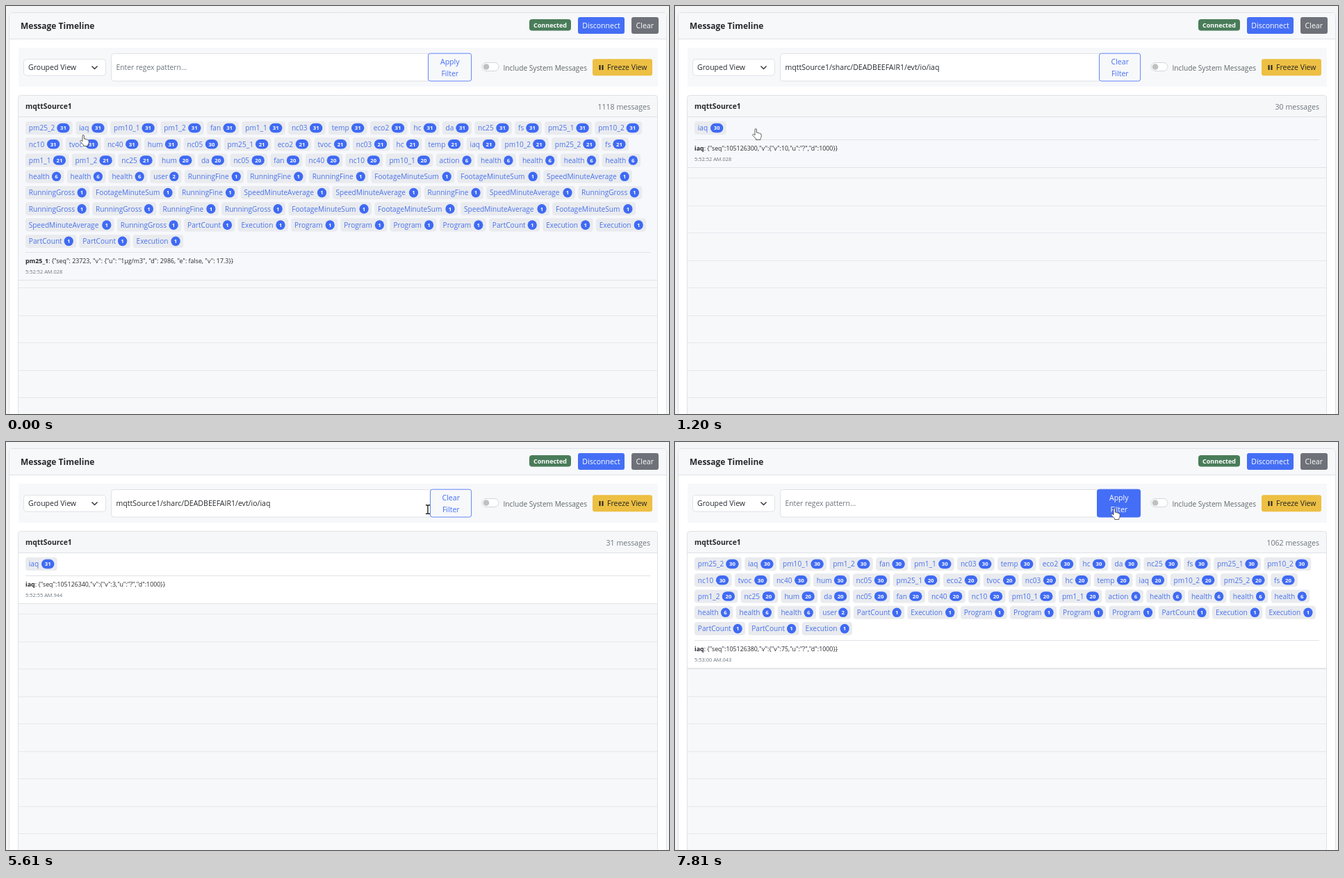
Write an HTML page with a canvas that moves like this. It is 954 px wide and 587 px high and loops after 8000 ms.

```html
<!DOCTYPE html>
<html lang="en">
<head>
<meta charset="utf-8">
<title>Message Timeline</title>
<style>
  html, body { margin: 0; width: 100%; height: 100%; overflow: hidden; background: #f4f5f6; }
  canvas { display: block; width: 954px; height: 587px; }
</style>
</head>
<body>
<canvas id="stage"></canvas>
<script>
const W = 954, H = 587, LOOP = 8000;
const canvas = document.getElementById('stage');
const ctx = canvas.getContext('2d');
const scale = window.devicePixelRatio || 1;
canvas.width = W * scale;
canvas.height = H * scale;

const INK = '#26292d', GREY = '#6c757d', BLUE = '#446ef5', LINE = '#dfe2e6', PALE = '#f7f8fa';
const FIRST_ROW = 175.5, ROW_STEP = 23.27;

// Distance from one chip to the next, by topic name
const PITCH = {
  pm25_1: 72.2, pm25_2: 72.2, pm10_1: 72.2, pm10_2: 72.2, pm1_1: 66.7, pm1_2: 66.7,
  iaq: 50, fan: 50.3, temp: 60, eco2: 57.8, hc: 46, da: 46.5, fs: 43, tvoc: 55.2, hum: 56.8,
  nc03: 57.9, nc05: 57.9, nc10: 57.9, nc25: 57.9, nc40: 57.9,
  action: 59.5, health: 59.8, user: 49.6, PartCount: 77.4, Execution: 76.5, Program: 71.2,
  RunningFine: 89.5, RunningGross: 96.3, FootageMinuteSum: 123.9, SpeedMinuteAverage: 132
};

// A bare number sets the count of the names after it; chips wrap into rows
function layoutChips(list) {
  let count = 0, x = 28, y = FIRST_ROW;
  const chips = [];
  for (const word of list.trim().split(/\s+/)) {
    if (/^\d+$/.test(word)) { count = word; continue; }
    const width = PITCH[word] - 4.3;
    if (x + width > 927) { x = 28; y += ROW_STEP; }
    chips.push({ name: word, count, x, y, width });
    x += PITCH[word];
  }
  return chips;
}

const FIRST = 'pm25_2 iaq pm10_1 pm1_2 fan pm1_1 nc03 temp eco2 hc da nc25 fs pm25_1 pm10_2 nc10 tvoc nc40 hum';
const SECOND = 'pm25_1 eco2 tvoc nc03 hc temp iaq pm10_2 pm25_2 fs';
const THIRD = 'hum da nc05 fan nc40 nc10 pm10_1';
const STATUS = '6 action health health health health health health health 2 user 1';
const PARTS = 'PartCount Execution Program Program Program Program PartCount Execution Execution PartCount PartCount Execution';
const RUNS = `RunningFine RunningFine RunningFine FootageMinuteSum FootageMinuteSum SpeedMinuteAverage
  RunningGross FootageMinuteSum RunningFine SpeedMinuteAverage SpeedMinuteAverage RunningFine SpeedMinuteAverage RunningGross
  RunningGross RunningGross RunningFine RunningGross FootageMinuteSum FootageMinuteSum SpeedMinuteAverage FootageMinuteSum
  SpeedMinuteAverage RunningGross`;

const VIEWS = [
  { from: 0, total: 1118, topic: 'pm25_1', time: '5:52:52 AM.028',
    body: '{"seq": 23723, "v": {"u": "1µg/m3", "d": 2986, "e": false, "v": 17.3}}',
    chips: layoutChips(`31 ${FIRST} 30 nc05 21 ${SECOND} pm1_1 pm1_2 nc25 20 ${THIRD} ${STATUS} ${RUNS} ${PARTS}`) },
  { from: 1000, total: 30, topic: 'iaq', time: '5:52:52 AM.028', filtered: true,
    body: '{"seq":105126300,"v":{"v":10,"u":"?","d":1000}}', chips: layoutChips('30 iaq') },
  { from: 3810, total: 31, topic: 'iaq', time: '5:52:55 AM.944', filtered: true,
    body: '{"seq":105126340,"v":{"v":3,"u":"?","d":1000}}', chips: layoutChips('31 iaq') },
  { from: 7810, total: 1062, topic: 'iaq', time: '5:53:00 AM.043',
    body: '{"seq":105126380,"v":{"v":75,"u":"?","d":1000}}',
    chips: layoutChips(`30 ${FIRST} nc05 20 ${SECOND} pm1_2 nc25 ${THIRD} pm1_1 ${STATUS} ${PARTS}`) }
];

const POINTER = [
  { from: 0, kind: 'hand', x: 106, y: 185 },
  { from: 200, kind: 'hand', x: 110, y: 177 },
  { from: 400, kind: 'hand', x: 111, y: 176 },
  { from: 4610, kind: 'hand', x: 210, y: 152 },
  { from: 4810, kind: 'hand', x: 391, y: 125 },
  { from: 5010, kind: 'arrow', x: 394, y: 125 },
  { from: 5210, kind: 'beam', x: 472, y: 94 },
  { from: 5410, kind: 'beam', x: 554, y: 88 },
  { from: 5610, kind: 'beam', x: 603, y: 90 },
  { from: 5810, kind: 'hand', x: 622, y: 96 },
  { from: 6010, kind: 'hand', x: 627, y: 96 },
  { from: 7010, kind: 'hand', x: 627, y: 95 }
];

const SHAPES = {
  hand: new Path2D('M4 9.8V1.9Q4 .6 5.2 .6T6.4 1.9V6.2Q8.3 5.3 8.8 6.9Q10.6 6.2 11.1 7.7Q13.2 7.2 13.2 9.2V11.6Q13.1 13.4 11.8 14.8V16.5H5.6V15L1.3 10.7Q0 9 1.3 8.5Q2.6 8.2 4 9.8Z'),
  arrow: new Path2D('M.6 .6V13L3.6 10.2 5.5 14.6 7.4 13.8 5.5 9.6H9.9Z'),
  beam: new Path2D('M1 .8H3L4 1.6 5 .8H7M4 1.6V12.4M1 13.2H3L4 12.4 5 13.2H7')
};

const current = (steps, t) => steps.filter(step => step.from <= t).pop();

function rect(x, y, w, h, fill) {
  ctx.fillStyle = fill;
  ctx.fillRect(x, y, w, h);
}

function box(x, y, w, h, radius, fill, stroke) {
  ctx.beginPath();
  ctx.roundRect(x, y, w, h, radius);
  if (fill) { ctx.fillStyle = fill; ctx.fill(); }
  if (stroke) { ctx.strokeStyle = stroke; ctx.lineWidth = 1; ctx.stroke(); }
}

function disc(x, y, radius, fill) {
  ctx.beginPath();
  ctx.arc(x, y, radius, 0, 7);
  ctx.fillStyle = fill;
  ctx.fill();
}

// y is the middle of the capital letters
function text(value, x, y, size, color = INK, align = 'left', weight = 400) {
  ctx.font = `${weight} ${size}px "Open Sans", "Noto Sans", sans-serif`;
  ctx.textAlign = align;
  ctx.fillStyle = color;
  ctx.fillText(value, x, y + size * 0.36);
  return ctx.measureText(value).width;
}

function drawHeader() {
  rect(0, 0, W, H, '#f4f5f6');
  box(4.5, 9.5, 946, 600, 5, '#fff', LINE);
  box(5, 10, 945, 37, [4, 4, 0, 0], PALE);
  rect(5, 47, 945, 1, LINE);
  text('Message Timeline', 21, 28.7, 12, INK, 'left', 700);
  box(753, 19, 60, 16.5, 4, '#497c59');
  text('Connected', 783, 27.7, 9, '#fff', 'center', 700);
  box(823, 16, 67, 24, 3, BLUE);
  text('Disconnect', 856.5, 28.3, 10.55, '#fff', 'center');
  box(900, 16, 39, 24, 3, '#6e7178');
  text('Clear', 919.3, 28.3, 10.55, '#fff', 'center');
}

function drawToolbar(filtered, hovered) {
  rect(18, 60, 920, 56, PALE);
  box(25.5, 76.5, 118, 23.5, 4, '#fff', LINE);
  text('Grouped View', 32, 88.7, 10.55);
  ctx.strokeStyle = '#343a40';
  ctx.lineWidth = 1.5;
  ctx.stroke(new Path2D('M123.5 86.5L127.5 90.5 131.5 86.5'));

  const left = filtered ? 610.5 : 607.5;
  box(151.5, 68.5, left - 151.5, 39.5, [4, 0, 0, 4], '#fff', LINE);
  if (filtered) text('mqttSource1/sharc/DEADBEEFAIR1/evt/io/iaq', 158.5, 88.7, 10.55);
  else text('Enter regex pattern...', 158.5, 88.7, 10.35, GREY);

  box(left, 68.2, 669.6 - left, 39.8, 3, hovered ? BLUE : PALE, hovered ? BLUE : '#6387f6');
  const color = hovered ? '#fff' : BLUE, middle = (left + 670) / 2;
  text(filtered ? 'Clear' : 'Apply', middle, 80.7, 10.55, color, 'center');
  text('Filter', middle, 97.4, 10.55, color, 'center');

  box(685, 81.5, 24, 12, 6, '#fff', '#d3d6da');
  disc(691, 87.5, 4.3, '#bfc0c2');
  text('Include System Messages', 715.5, 89, 10.16, '#5e676b');

  box(844, 76.2, 86, 24, 3, '#edc044');
  rect(853.5, 85, 2, 7, '#222');
  rect(857.5, 85, 2, 7, '#222');
  text('Freeze View', 865, 88.7, 10.5, '#222');
}

function drawChip({ name, count, x, y, width }, hovered) {
  box(x, y - 9.5, width, 19, 4, hovered ? '#d9dde3' : '#e9ebef');
  text(name, x + 4.8, y + 0.2, 10.12, '#4a72ea');
  const badge = count.length > 1 ? 18.4 : 13.2;
  const badgeX = x + width - 4.3 - badge;
  box(badgeX, y - 6.8, badge, 13.6, 6.8, '#3f6af3');
  text(count, badgeX + badge / 2, y, 7.8, '#fff', 'center', 700);
}

function drawList(view, t) {
  rect(18, 129, 920, H, PALE);
  for (let y = 247.4; y < H; y += 39.5) rect(18, Math.round(y), 920, 1, '#e6e8eb');

  const rule = Math.round(view.chips.at(-1).y + 16);
  const bottom = rule + 40;
  const background = t < 4810 ? '#f7f8fb' : t < 5010 ? '#fbfbfd' : '#fff';
  rect(18, 129, 920, bottom - 129, background);
  rect(18, bottom, 920, 1, LINE);
  rect(18, 129, 920, 30, '#f6f7f9');
  rect(18, 159, 920, 1, LINE);
  box(17.5, 128.5, 920, 500, [4, 4, 0, 0], null, LINE);

  text('mqttSource1', 28, 144.7, 10.4, INK, 'left', 700);
  text(`${view.total} messages`, 927, 145, 10.6, GREY, 'right');
  const pointing = t >= 200 && t < 1000;
  view.chips.forEach((chip, i) => drawChip(chip, pointing && i === 1));
  rect(28, rule, 899, 1, LINE);

  ctx.globalAlpha = t >= 1000 && t < 1200 ? 0.5 : 1;
  const width = text(view.topic, 28, rule + 12.8, 8.85, INK, 'left', 700);
  text(`: ${view.body}`, 28 + width, rule + 12.8, 8.85);
  text(view.time, 28, rule + 28, 7.45, GREY);
  ctx.globalAlpha = 1;
}

function drawPointer({ kind, x, y }) {
  ctx.save();
  ctx.translate(x, y);
  ctx.lineJoin = 'round';
  ctx.lineWidth = kind === 'beam' ? 1.4 : 0.8;
  ctx.strokeStyle = kind === 'beam' ? '#222' : '#3a3a3a';
  ctx.fillStyle = '#fff';
  if (kind !== 'beam') ctx.fill(SHAPES[kind]);
  ctx.stroke(SHAPES[kind]);
  ctx.restore();
}

function draw(t) {
  const view = current(VIEWS, t);
  ctx.setTransform(scale, 0, 0, scale, 0, 0);
  drawHeader();
  drawToolbar(view.filtered, t >= 5810);
  drawList(view, t);
  if (t >= 7610 && t < 7810) disc(632.5, 95.5, 9.5, 'rgba(224, 214, 80, 0.75)');
  drawPointer(current(POINTER, t));
  if (t >= 800 && t < 1000) {
    rect(125, 187.5, 144, 19.5, '#1b1d20');
    text('sharc/DEADBEEFAIR1/evt/io/iaq', 130.5, 197.5, 9.07, '#f1f1f1');
  }
}

const start = performance.now();
function tick() {
  draw((performance.now() - start) % LOOP);
  requestAnimationFrame(tick);
}
tick();
</script>
</body>
</html>
```
